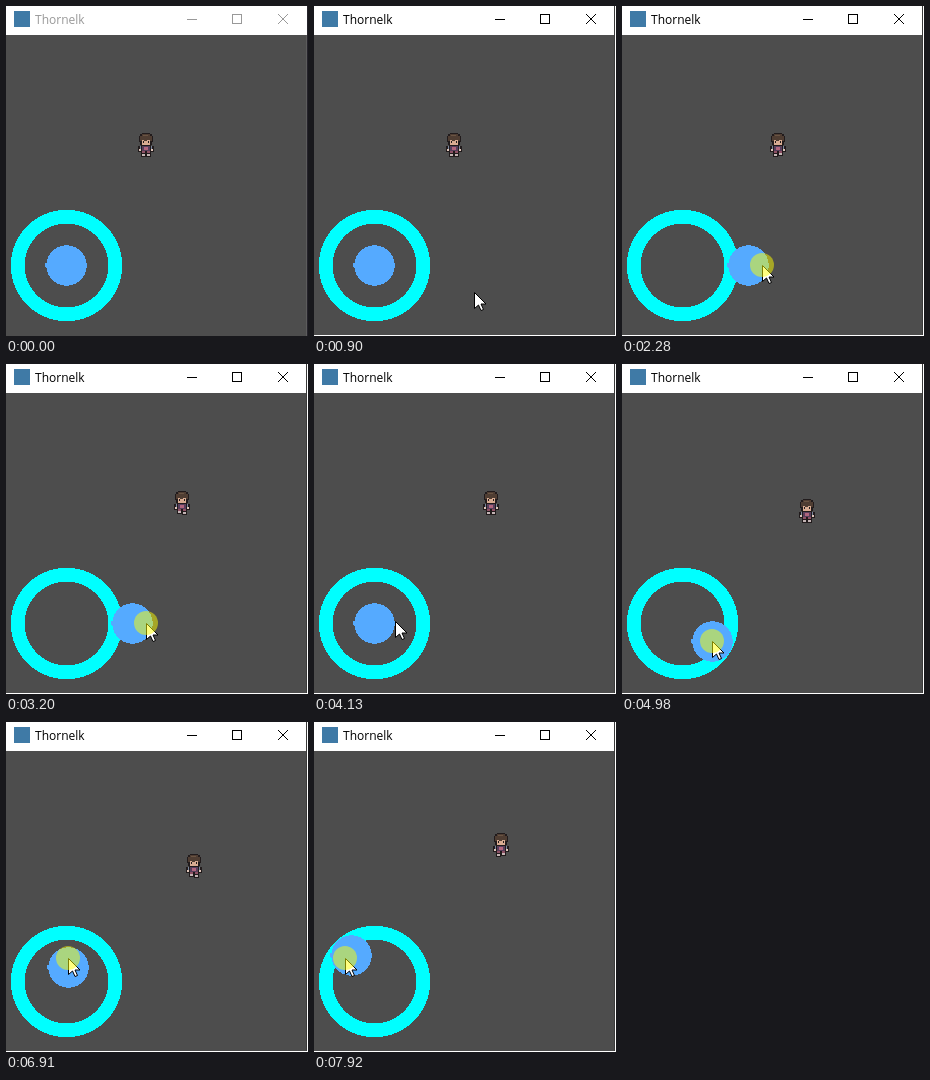
Write an HTML page with a canvas that moves like this. It is 302x330 px and loops after 7990 ms.

```html
<!DOCTYPE html>
<html lang="en">
<head>
<meta charset="utf-8">
<title>Thornelk</title>
<style>
  html, body { margin: 0; width: 100%; height: 100%; overflow: hidden; background: #4d4d4d; }
  canvas { position: absolute; left: 0; top: 0; display: block; }
  #title {
    position: absolute; left: 29px; top: 5px;
    font: 12px/17px "Open Sans", "Noto Sans", sans-serif; white-space: nowrap;
  }
</style>
</head>
<body>
<canvas id="stage" width="302" height="330"></canvas>
<div id="title">Thornelk</div>
<script>
const LOOP = 7990;
const TICK = 76.9;        // screen refresh
const FIRST = -18;        // time of tick 0
const LAG = 70;           // the knob trails the pointer
const REACH = 66;         // farthest the knob can be pulled
const DEAD = 8;           // pull needed before the hero walks
const STRIDE = 1.6;       // pixels per tick
const HOME = { x: 60, y: 259 };
const BG = '#4d4d4d';

const ctx = document.getElementById('stage').getContext('2d');
const title = document.getElementById('title');

// Pointer strokes: begin, end, target x, target y, sag
const strokes = [
  [70, 120, 258, 264, 0],
  [520, 1280, 64, 264, 22],
  [1360, 2010, 140, 259, 0],
  [3215, 3510, 180, 245, 0],
  [3740, 4200, 65, 259, 0],
  [4450, 4650, 90, 277, 0],
  [5450, 5530, 63, 265, 0],
  [5760, 6050, 63, 234, 0],
  [6520, 6700, 62, 256, 0],
  [6750, 6905, 62, 236, 0],
  [7000, 7300, 56, 222, 0],
  [7620, 7900, 31, 236, 0]
];
const presses = [[1360, 3250], [4350, 5100], [5760, 6250], [6750, LOOP]];
const pressed = t => presses.some(([a, b]) => t >= a && t < b);

function pointerAt(t) {
  let x = 258, y = 292;
  for (const [from, to, tx, ty, sag] of strokes) {
    const p = Math.min(1, Math.max(0, (t - from) / (to - from)));
    x += (tx - x) * p;
    y += (ty - y) * p + sag * Math.sin(Math.PI * p);
  }
  return { x: Math.round(x), y: Math.round(y) };
}

function knobAt(t) {
  if (!pressed(t)) return HOME;
  const tip = pointerAt(t - LAG);
  const dx = tip.x - HOME.x, dy = tip.y - HOME.y;
  const k = Math.min(1, REACH / Math.hypot(dx, dy));
  return { x: Math.round(HOME.x + dx * k), y: Math.round(HOME.y + dy * k) };
}

// Eight-way walking steered by the knob
const timeOf = i => FIRST + i * TICK;
const walk = [];
for (let i = 0, x = 132.4, y = 127.4; timeOf(i) < LOOP; i++) {
  const t = timeOf(i);
  const knob = knobAt(t);
  const dx = knob.x - HOME.x, dy = knob.y - HOME.y;
  const pull = Math.hypot(dx, dy);
  const moving = pull > DEAD;
  walk.push({ x: Math.round(x), y: Math.round(y), moving });
  const step = d => moving && Math.abs(d) > .42 * pull ? Math.sign(d) * STRIDE : 0;
  x += step(dx);
  y += step(dy);
}

function box(color, x, y, w, h) {
  ctx.fillStyle = color;
  ctx.fillRect(x, y, w, h);
}

// Circle with hard pixel edges
function disc(color, cx, cy, r) {
  for (let y = Math.floor(cy - r); y <= cy + r; y++) {
    const d = y + .5 - cy;
    if (Math.abs(d) >= r) continue;
    const half = Math.sqrt(r * r - d * d);
    const left = Math.round(cx - half);
    box(color, left, y, Math.round(cx + half) - left, 1);
  }
}

function drawWindow(active) {
  box(BG, 0, 0, 302, 330);
  box('#fff', 0, 0, 301, 29);
  box(active ? '#3a3a3a' : '#5c5c5c', 300, active ? 0 : 29, 1, 330);
  box(active ? '#fff' : '#26242c', 301, 0, 1, 330);
  if (active) box('#fff', 0, 329, 301, 1);
  box('#3f7aa6', 8, 5, 16, 16);

  const ink = active ? '#000' : '#999';
  title.style.color = ink;
  box(ink, 181, 13, 10, 1);
  ctx.strokeStyle = ink;
  ctx.lineWidth = 1;
  ctx.strokeRect(226.5, 8.5, 9, 9);
  ctx.beginPath();
  ctx.moveTo(272, 8); ctx.lineTo(282, 18);
  ctx.moveTo(282, 8); ctx.lineTo(272, 18);
  ctx.stroke();
}

function drawHero({ x, y }, foot) {
  const part = (c, dx, dy, w, h) => box(c, x + dx, y + dy, w, h);
  const pair = (c, dx, dy, w, h) => {
    part(c, dx, dy, w, h);
    part(c, 16 - dx - w, dy, w, h);
  };
  const dark = '#211b1c', hair = '#4f3d32', skin = '#d9ac92';
  // head
  part(dark, 4, 0, 8, 1);
  part(dark, 2, 1, 12, 11);
  part(dark, 1, 3, 14, 6);
  part(hair, 4, 1, 8, 2);
  part(hair, 2, 3, 12, 5);
  part('#6a5443', 5, 2, 5, 1);
  part(skin, 4, 7, 8, 5);
  part(hair, 6, 7, 3, 1);
  pair(dark, 5, 8, 1, 2);
  // body and arms
  part(dark, 3, 12, 10, 9);
  pair(dark, 0, 13, 4, 6);
  pair('#77849b', 2, 13, 1, 3);
  pair('#e0c6ba', 1, 16, 2, 2);
  part('#583f5c', 4, 13, 8, 5);
  part('#b0647c', 6, 14, 4, 3);
  // legs
  [4, 9].forEach((dx, side) => {
    const lift = foot === side * 2 + 1 ? 1 : 0;
    part(dark, dx - 1, 18, 5, 6 - lift);
    part('#8d5064', dx, 18, 3, 2);
    part('#c3b4b4', dx, 21 - lift, 3, 2);
  });
}

function drawPointer({ x, y }) {
  ctx.save();
  ctx.translate(x + .5, y + .5);
  ctx.fillStyle = '#fff';
  ctx.strokeStyle = '#000';
  const arrow = new Path2D('M0 0V16L4 12.5 6.5 18 9 17 6.5 11.5H11.5Z');
  ctx.fill(arrow);
  ctx.stroke(arrow);
  ctx.restore();
}

function draw(now) {
  const i = Math.max(0, Math.floor((now - FIRST + 15) / TICK));
  const t = timeOf(Math.min(i, walk.length - 1));
  const hero = walk[Math.min(i, walk.length - 1)];
  drawWindow(now >= 290);
  drawHero(hero, hero.moving ? (i >> 1) % 4 : 0);

  const knob = knobAt(t);
  disc('#00ffff', 60.5, 259.5, 55.7);
  disc(BG, 60.5, 259.5, 41.8);
  disc('#55aaff', knob.x + .5, knob.y + .5, 20.2);
  box('#55aaff', knob.x - 21, knob.y - 2, 2, 4);

  if (now < 70) return;
  const tip = pointerAt(t);
  drawPointer(tip);
  if (pressed(t)) {
    ctx.fillStyle = 'rgba(255,255,0,.5)';
    ctx.beginPath();
    ctx.arc(tip.x, tip.y, 12, 0, 7);
    ctx.fill();
  }
}

const start = performance.now();
function tick() {
  draw((performance.now() - start) % LOOP);
  requestAnimationFrame(tick);
}
tick();
</script>
</body>
</html>
```
